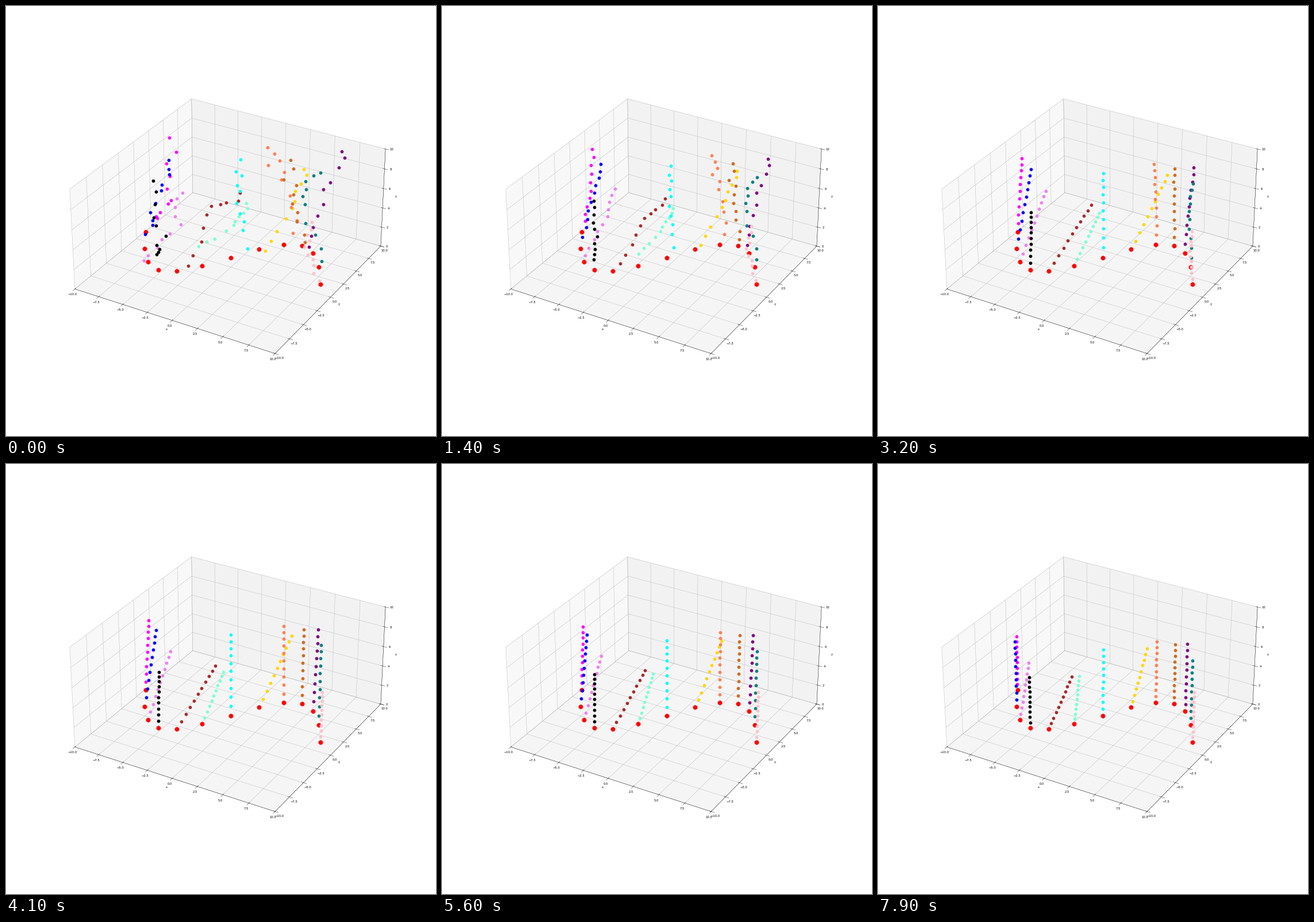
A matplotlib script for the animation above (8 s loop, 748 px wide and 748 px high).

```python
import numpy as np
import matplotlib.pyplot as plt
from matplotlib.animation import FuncAnimation
from mpl_toolkits.mplot3d import proj3d

SIZE, FRAMES, INTERVAL = 748, 80, 100
DOTS, SETTLE, LAST = 10, 4.1, 7.9

# color, scattered start (top, middle, bottom), settled tip, final tip
SWARMS = [
    ("magenta", [(287, 230), (288, 328), (265, 372)], (248, 272), (241, 300)),
    ("blue", [(286, 270), (264, 335), (246, 398)], (261, 289), (238, 309)),
    ("violet", [(303, 322), (292, 389), (242, 442)], (286, 326), (262, 346)),
    ("black", [(252, 302), (267, 396), (270, 438)], (266, 362), (263, 371)),
    ("brown", [(412, 325), (358, 356), (314, 452)], (364, 351), (337, 370)),
    ("aquamarine", [(418, 343), (403, 375), (333, 423)], (378, 362), (350, 369)),
    ("cyan", [(400, 268), (398, 329), (421, 418)], (391, 297), (392, 323)),
    ("gold", [(524, 280), (499, 345), (450, 428)], (497, 299), (468, 321)),
    ("coral", [(458, 247), (478, 294), (505, 393)], (483, 282), (485, 309)),
    ("chocolate", [(494, 268), (503, 335), (517, 411)], (518, 288), (517, 314)),
    ("purple", [(588, 251), (555, 333), (524, 418)], (543, 288), (538, 313)),
    ("teal", [(538, 283), (514, 337), (550, 449)], (548, 315), (547, 342)),
    ("pink", [(528, 376), (519, 424), (536, 476)], (550, 397), (550, 397)),
]

rng = np.random.default_rng(4)
fig = plt.figure(figsize=(20, 20), dpi=SIZE / 20, facecolor="white")
box = fig.add_subplot(projection="3d")

# Goals lie on one full sine wave across the floor
step = np.arange(len(SWARMS))
goal_x = -9.93 + 1.518 * step
goal_y = 1.42 - 5.05 * np.sin(step * np.pi / 6)
floor = np.zeros(len(SWARMS))
box.scatter(goal_x, goal_y, floor, s=200, color="red", depthshade=False)
box.set(xlim=(-10, 10), ylim=(-10, 10), zlim=(0, 10),
        xlabel="x", ylabel="y", zlabel="z")
box.set_box_aspect((2, 2, 1))

# Flat overlay in stage pixels, y pointing down
stage = fig.add_axes([0, 0, 1, 1])
stage.set(xlim=(0, SIZE), ylim=(SIZE, 0))
stage.axis("off")


def to_stage(x, y, z):
    """Project points of the box to stage pixels."""
    px, py, _ = proj3d.proj_transform(x, y, z, box.get_proj())
    shown = box.transData.transform(np.column_stack([px, py]))
    return stage.transData.inverted().transform(shown)


def column(goal, tip, squeeze):
    """Dots from tip down towards goal, packed closer near the tip."""
    u = np.arange(DOTS, 0, -1) / DOTS
    u = u + squeeze * u * (1 - u)
    return goal + np.outer(u, np.subtract(tip, goal))


def cloud(path):
    """Dots spread along a path, each pushed off it a little."""
    along = np.linspace(0, len(path) - 1, DOTS)
    line = [np.interp(along, range(len(path)), axis) for axis in zip(*path)]
    return np.column_stack(line) + rng.normal(0, (5, 3), (DOTS, 2))


class Swarm:
    """Scattered dots that settle into a slowly sinking column."""

    def __init__(self, color, path, settled_tip, final_tip, goal, power):
        self.power = power
        self.settled = column(goal, settled_tip, 0.2)
        self.drift = (column(goal, final_tip, 0.06) - self.settled) / (LAST - SETTLE)
        self.scatter = cloud(path) - self.line(0)
        self.art = stage.scatter(*self.line(0).T, s=100, color=color)

    def line(self, t):
        return self.settled + self.drift * (t - SETTLE)

    def move(self, t):
        fade = max(0, 1 - t / SETTLE) ** self.power
        self.art.set_offsets(self.line(t) + self.scatter * fade)
        return self.art


fig.canvas.draw()
goals = to_stage(goal_x, goal_y, floor)
# Swarms on the left settle fastest
powers = np.linspace(3, 1, len(SWARMS))
swarms = [Swarm(*row, goal, power)
          for row, goal, power in zip(SWARMS, goals, powers)]


def draw(frame):
    t = frame * INTERVAL / 1000
    return [swarm.move(t) for swarm in swarms]


anim = FuncAnimation(fig, draw, frames=FRAMES, interval=INTERVAL,
                     repeat=True, repeat_delay=0)
plt.show()
```
